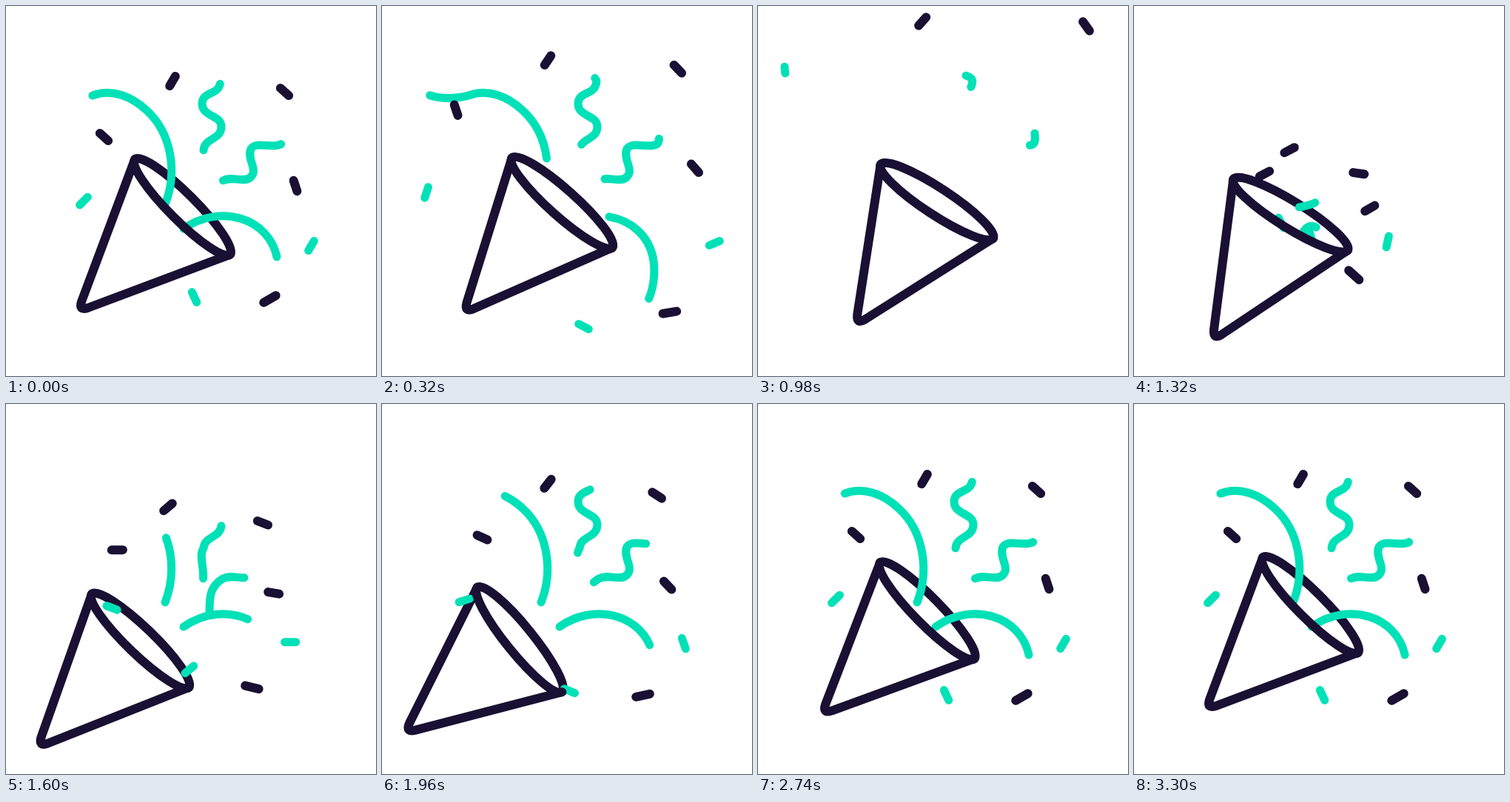
Recreate the animation shown at these times as an HTML page. Size 500 by 500 pixels, loop 3.32 s.

```html
<!DOCTYPE html>
<html lang="en">
<head>
<meta charset="utf-8">
<title>Party popper</title>
<style>
  html, body { margin: 0; width: 100%; height: 100%; overflow: hidden; background: #fff; }
  svg { display: block; width: 100vw; height: 100vh; }
  path { fill: none; stroke-linecap: round; stroke-linejoin: round; }
  .dark { stroke: #1a1033; stroke-width: 12; }
  .teal { stroke: #00e1b7; stroke-width: 11; }
</style>
</head>
<body>
<svg viewBox="0 0 500 500">
  <g class="cone">
    <path class="dark" d="M-91 -193L-6 -6Q0 6 6 -6L91 -193A91 18 0 0 0 -91 -193"/>
  </g>
  <g id="confetti"></g>
  <g class="cone">
    <path class="dark" d="M-91 -193A91 18 0 0 0 91 -193"/>
  </g>
</svg>
<script>
const LOOP = 3320;
const layer = document.getElementById('confetti');
const cones = document.querySelectorAll('.cone');

const clamp = (v, lo = 0, hi = 1) => Math.min(hi, Math.max(lo, v));
const mix = (a, b, k) => a + (b - a) * k;
const swing = x => (1 - Math.cos(Math.PI * clamp(x))) / 2;

// Both reach 1 at 1320 ms and ease down to 0
const flightLeft = t => (clamp((2400 - t) / 1250) / 0.864) ** 3;
const turnLeft = t => clamp((2600 - t) / 1280, 0, 2) ** 2;

function addPath(cls, d) {
  const el = document.createElementNS('http://www.w3.org/2000/svg', 'path');
  el.setAttribute('class', cls);
  el.setAttribute('d', d);
  layer.append(el);
  return el;
}

function lengthOf(d) {
  const el = addPath('teal', d);
  const len = el.getTotalLength();
  el.remove();
  return len;
}

function trim(el, from, to) {
  const on = to - from > 0.3;
  el.style.display = on ? '' : 'none';
  if (!on) return;
  el.setAttribute('stroke-dasharray', `${to - from} 2000`);
  el.setAttribute('stroke-dashoffset', -from);
}

// Cone: time, apex x, apex y, tilt
const coneKeys = [
  [0, 102, 408, 45], [620, 132, 414, 37], [950, 137, 424, 33.5],
  [1320, 110, 446, 31.8], [1500, 70, 461, 38], [1640, 41, 457, 46],
  [1780, 31, 449, 50.5], [1960, 36, 440, 51], [2180, 50.5, 434, 49],
  [2420, 72, 425, 46.8], [2740, 91, 414.5, 45.5], [LOOP, 102, 408, 45]
];

function slope(i, c) {
  const a = coneKeys[i - 1], b = coneKeys[i + 1];
  return a && b ? (b[c] - a[c]) / (b[0] - a[0]) : 0;
}

function coneAt(t, c) {
  const i = coneKeys.findIndex((k, n) => n && t <= k[0]) - 1;
  const a = coneKeys[i], b = coneKeys[i + 1];
  const h = b[0] - a[0], u = (t - a[0]) / h, v = 1 - u;
  return a[c] * (1 + 2 * u) * v * v + b[c] * u * u * (3 - 2 * u)
    + h * u * v * (slope(i, c) * v - slope(i + 1, c) * u);
}

// Streamers: part seen at rest, part used when flying off
const streamers = [
  { rest: 'M215 268C232 225 224 172 190 141C170 122.5 143 111 117 121',
    away: 'C88 129 36 126 36 82', gone: 1100, power: 3 },
  { rest: 'M240 301C290 266 355 287 366 339',
    away: 'C371 362 369 420 318 429', gone: 940, power: 5 }
].map(s => ({
  ...s,
  el: addPath('teal', s.rest + s.away),
  tip: lengthOf(s.rest),
  end: lengthOf(s.rest + s.away)
}));

function drawStreamer(s, t) {
  if (t < 1200) {
    trim(s.el, s.end * swing(t / s.gone), mix(s.tip, s.end, swing(t / 640)));
  } else {
    const left = clamp((2960 - t) / 1620) ** s.power;
    trim(s.el, 0, s.tip * (1 - left));
  }
}

// Squiggles: way in, shape at rest, way out
const squiggles = [
  { lead: 'M223 272C236 269 250 268 262 250S258 206 267 195',
    rest: 'C268 178 291 181 291 163C291 147 265 150 265 132C265 116 286 120 289 106',
    away: 'C292 98 286 96 281 94' },
  { lead: 'M228 307C234 294 246 294 253 307C262 320 275 300 275 280S276 246 293 236',
    rest: 'C306 229 322 240 331 231C341 221 325 207 331 193C338 182 358 193 371 187',
    away: 'C376 184 374 177 374 172' }
].map(s => ({
  el: addPath('teal', s.lead + s.rest + s.away),
  tail: lengthOf(s.lead),
  tip: lengthOf(s.lead + s.rest),
  end: lengthOf(s.lead + s.rest + s.away)
}));

function drawSquiggle(s, t) {
  if (t < 1200) {
    trim(s.el, mix(s.tail, s.end, clamp(t / 1050) ** 2.4), mix(s.tip, s.end, swing(t / 640)));
  } else {
    const left = flightLeft(t);
    trim(s.el, Math.max(0, s.tail * (1 - left)), mix(s.tip, 22, left));
  }
}

// Pieces: class, half length, [x, y, turn] at rest / flying off / coming in,
// flight time, time hidden, time shown
const pieces = [
  ['dark', 7.6, [225, 101.5, -60], [222.5, 30.5, -50], [210, 195, -28], 800, 1120, 1200],
  ['dark', 7.6, [376.5, 116, 42], [435.5, 38, 53], [303.5, 226.5, 8], 800, 1120, 1200],
  ['dark', 7.6, [132.5, 177, 42], [50.5, 85, 117], [176.5, 227, -28], 800, 900, 1200],
  ['dark', 7.6, [391, 243, 72], [472, 183, 13], [318.5, 273.5, -30], 800, 820, 1200],
  ['dark', 9.5, [356.5, 396, -30], [438.5, 442, 22], [297, 363.5, 42], 800, 950, 1200],
  ['teal', 7.6, [105, 263.5, -45], [14, 240, -100], [199, 293, 63], 650, 605, 1290],
  ['teal', 7.6, [412.5, 324, 300], [487, 317, 375], [342.5, 318.5, 102], 650, 720, 1200],
  ['teal', 7.6, [254.5, 393.5, 65], [291, 474, -12], [238, 308, -107], 650, 780, 1290]
].map(([cls, half, rest, off, enter, span, hide, show]) => ({
  el: addPath(cls, `M${-half} 0H${half}`),
  rest, off, enter, span, hide, show
}));

function drawPiece(p, t) {
  const size = t < 1150 ? clamp((p.hide - t) / 50) : clamp((t - p.show) / 30);
  p.el.style.display = size ? '' : 'none';
  if (!size) return;
  let pose;
  if (t < 1150) {
    const k = swing(t / p.span) / swing(620 / p.span);
    pose = p.rest.map((v, i) => mix(v, p.off[i], k));
  } else {
    const move = flightLeft(t), turn = turnLeft(t);
    pose = p.rest.map((v, i) => mix(v, p.enter[i], i < 2 ? move : turn));
  }
  const [x, y, a] = pose;
  p.el.setAttribute('transform', `translate(${x} ${y}) rotate(${a}) scale(${size})`);
}

function draw(t) {
  const [x, y, a] = [1, 2, 3].map(c => coneAt(t, c));
  cones.forEach(g => g.setAttribute('transform', `translate(${x} ${y}) rotate(${a})`));
  streamers.forEach(s => drawStreamer(s, t));
  squiggles.forEach(s => drawSquiggle(s, t));
  pieces.forEach(p => drawPiece(p, t));
}

const begin = performance.now();
function tick() {
  draw(Math.max(0, performance.now() - begin) % LOOP);
  requestAnimationFrame(tick);
}
draw(0);
requestAnimationFrame(tick);
</script>
</body>
</html>
```
